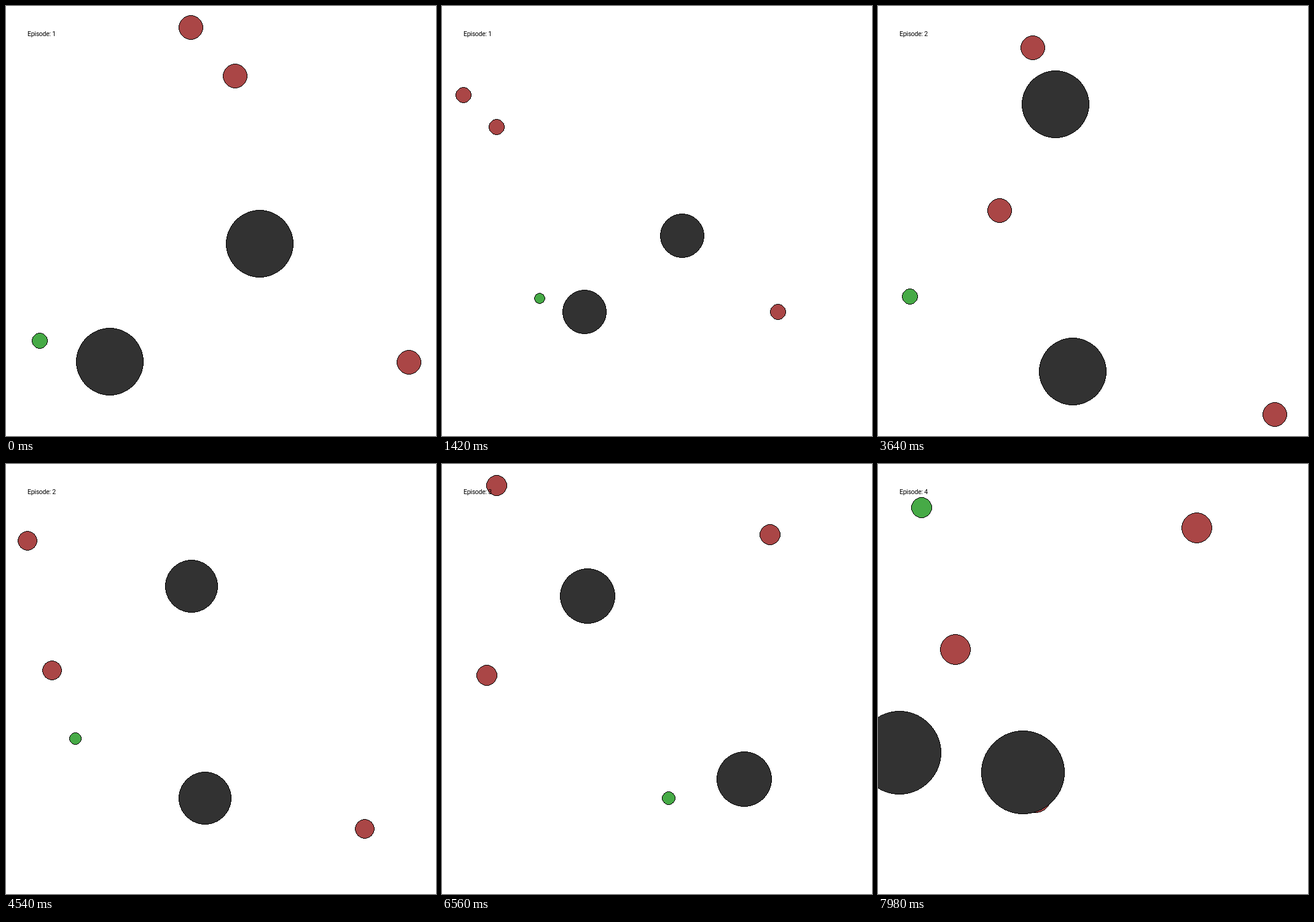
Write an HTML page with a canvas that moves like this. It is 700 by 700 pixels and loops after 8 s.

```html
<!DOCTYPE html>
<html lang="en">
<head>
<meta charset="utf-8">
<title>Predators and prey</title>
<style>
  html, body { margin: 0; width: 100%; height: 100%; overflow: hidden; background: #fff; }
  canvas { display: block; }
  #label {
    position: absolute; left: 35px; top: 39px; margin: 0; white-space: nowrap; color: #000;
    font: 10.5px/13px Roboto, "Liberation Sans", sans-serif; letter-spacing: -0.25px;
  }
</style>
</head>
<body>
<canvas id="stage" width="700" height="700"></canvas>
<p id="label"></p>
<script>
const LOOP = 8000, SIZE = 700, CENTER = 350, REACH = 315;

// Distance covered after n steps of full thrust with drag and a speed limit.
function thrust(n) {
  let speed = 0, distance = 0;
  for (let i = 0; i < n; i++) {
    speed = Math.min(1, speed * 0.75 + 0.3);
    distance += speed * 0.1;
  }
  return distance;
}

// Motion rules: step number to offset from the centre.
const drift = (x, y, dx = 0, dy = 0) => n => [x + dx * n, y + dy * n];
const glideLeft = (x, y, scale, dy = 0) => n => [x - thrust(n) * scale, y + dy * n];
const sink = (x, y, dx, fall) => n => [x + dx * n, y - fall * (n / 20) ** 3];

// Glides left, is thrown upwards off an obstacle at the given step, then glides on.
const bounce = (x, y, hit, scale, kick) => n => n <= hit
  ? [x + (thrust(hit) - thrust(n)) * scale, y]
  : [x - thrust(n - hit) * scale * 0.78, y - kick * (1 - 0.77 ** (n - hit))];

// Bodies in order: three chasers, the runner, two obstacles.
const episodes = [
  { start: 0, radius: 55.65, bodies: [
    glideLeft(-49, -315, 329.3), glideLeft(23, -236, 321), drift(305.6, 229.6, -0.15, -0.1),
    drift(-294.6, 194.6),
    drift(63, 37), drift(-181, 228.5)] },
  { start: 2520, radius: 55.1, bodies: [
    glideLeft(241.2, -277.3, 330.8, -0.24), glideLeft(68.7, -17, 215), sink(295.2, 315, -0.08, 7.8),
    drift(-295.8, 122, -0.067),
    drift(-60.6, -189), drift(-32.4, 243.6)] },
  { start: 5040, radius: 61.6, bodies: [
    drift(248, -314.2, -0.03, -0.11), bounce(-145, -240, 7, 364, 203), drift(-218.3, -8, -9.67),
    drift(33.4, 261, -0.49),
    drift(-152, -181.4), drift(191, 218.6)] },
  { start: 6960, radius: 68.3, bodies: [
    drift(169, -246), glideLeft(-34.6, -48, 205), glideLeft(283, 193, 407),
    drift(-279, -279),
    drift(-315, 120), drift(-114, 152)] }
];

const CHASER = { fill: '#aa4646', size: 0.375 };
const RUNNER = { fill: '#46aa46', size: 0.25 };
const OBSTACLE = { fill: '#323232', size: 1 };
const kinds = [CHASER, CHASER, CHASER, RUNNER, OBSTACLE, OBSTACLE];

const ctx = document.getElementById('stage').getContext('2d');
const label = document.getElementById('label');

// Midpoint circle: calls visit(a, b) for the pixels of one octant and its mirror.
function walkCircle(radius, visit) {
  let x = 0, y = radius, error = 1 - radius;
  while (x < y) {
    if (error >= 0) {
      y--;
      error -= 2 * y;
    }
    x++;
    error += 2 * x + 1;
    visit(x, y);
    visit(y, x);
  }
}

// A hard-edged disc with a one-pixel black rim.
function drawDisc(cx, cy, radius, fill) {
  ctx.fillStyle = fill;
  walkCircle(radius, (a, b) => {
    ctx.fillRect(cx - a, cy - b, 2 * a, 1);
    ctx.fillRect(cx - a, cy + b - 1, 2 * a, 1);
  });
  ctx.fillStyle = '#000';
  walkCircle(radius, (a, b) => {
    for (const px of [cx - a, cx + a - 1]) {
      for (const py of [cy - b, cy + b - 1]) ctx.fillRect(px, py, 1, 1);
    }
  });
}

function draw(time) {
  const index = episodes.findLastIndex(e => time >= e.start);
  const { start, radius, bodies } = episodes[index];
  // The opening pose lasts 20 ms, every later step 100 ms.
  const step = Math.max(0, 1 + Math.floor((time - start - 20) / 100));
  const spots = bodies.map(body => body(step));
  // The view zooms so that the farthest body stays at the margin.
  const zoom = REACH / Math.max(...spots.flat().map(Math.abs));
  const place = offset => Math.round(CENTER + offset * zoom);

  ctx.fillStyle = '#fff';
  ctx.fillRect(0, 0, SIZE, SIZE);
  spots.forEach(([x, y], i) => {
    const { fill, size } = kinds[i];
    drawDisc(place(x), place(y), Math.floor(radius * zoom * size), fill);
  });
  label.textContent = `Episode: ${index + 1}`;
}

const origin = performance.now();
function tick() {
  draw((performance.now() - origin) % LOOP);
  requestAnimationFrame(tick);
}
tick();
</script>
</body>
</html>
```
